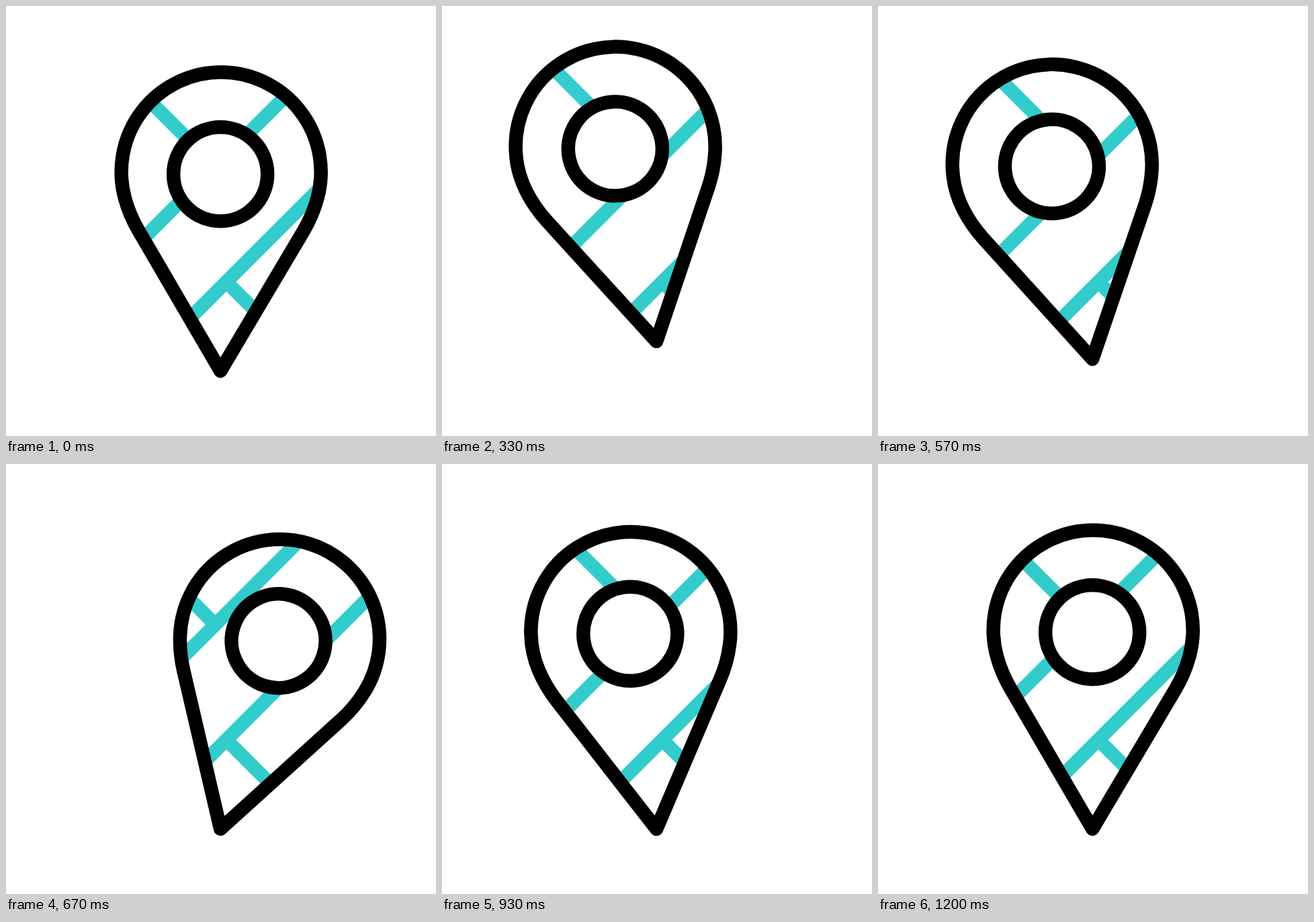
An HTML page that plays this animation: 640 by 640 pixels, repeating every 1670 ms.

```html
<!DOCTYPE html>
<html lang="en">
<head>
<meta charset="utf-8">
<title>Map pin</title>
<style>
  html, body { margin: 0; height: 100%; overflow: hidden; background: #fff; }
  svg { display: block; width: 100%; height: 100%; }
</style>
</head>
<body>
<svg viewBox="0 0 640 640" fill="none" stroke-width="20.5">
  <defs>
    <!-- The pin's tip is the local origin -->
    <path id="drop" d="M0 0L-122 -209Q-135.6 -232.4 -142.4 -257.6A148.5 148.5 0 1 1 144.4 -257.6Q137.5 -231.9 124 -209Z"/>
    <clipPath id="inside"><use href="#drop" class="move"/></clipPath>
  </defs>
  <g clip-path="url(#inside)" stroke="#3cc">
    <path d="M0 550.5L550.5 0M311.5 239L72.5 0M100 638.5L640 98.5M328 410.5L540 622.5"/>
  </g>
  <g class="move" stroke="#000" stroke-linejoin="round">
    <use href="#drop"/>
    <circle cy="-293" r="70" fill="#fff"/>
  </g>
</svg>
<script>
const LOOP = 1670, STEP = 33.3;
const parts = document.querySelectorAll('.move');

// Keys are [step, value]
const swing = [[4.5, 0], [15, -22.5], [21, 20], [27.2, -8], [33.5, 1.5], [36, 0]];
const lift = [[4.5, 0], [14, -71], [18.5, 0]];

function valueAt(keys, k) {
  const i = keys.findIndex(key => key[0] > k);
  if (i <= 0) return 0;
  const [k0, v0] = keys[i - 1], [k1, v1] = keys[i];
  const ease = (1 - Math.cos(Math.PI * (k - k0) / (k1 - k0))) / 2;
  return v0 + (v1 - v0) * ease;
}

function draw() {
  const k = Math.floor((performance.now() % LOOP + 6) / STEP);
  const pose = `translate(319.2 ${543.2 + valueAt(lift, k)}) rotate(${valueAt(swing, k)})`;
  parts.forEach(part => part.setAttribute('transform', pose));
  requestAnimationFrame(draw);
}
draw();
</script>
</body>
</html>
```
